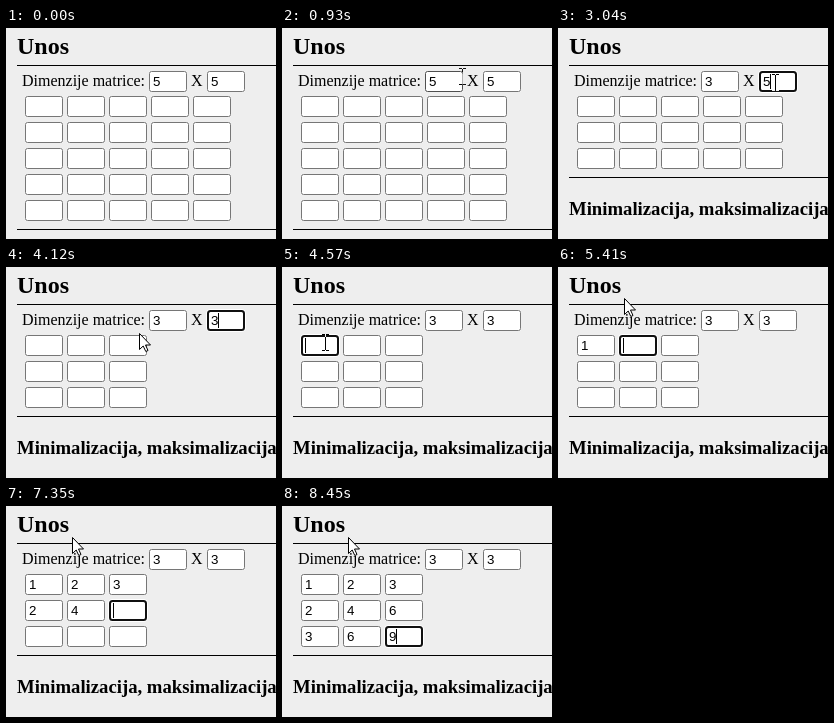
An HTML page with a canvas for the animation above (8820 ms loop, 270x211 px).

```html
<!DOCTYPE html>
<html lang="hr">
<head>
<meta charset="utf-8">
<style>
  html, body { margin: 0; width: 100%; height: 100%; overflow: hidden; background: #eee; }
  canvas { display: block; }
</style>
</head>
<body>
<canvas id="stage" width="270" height="211"></canvas>
<script>
const ctx = document.getElementById('stage').getContext('2d');
const LOOP = 8820, BLINK = 530, W = 38, H = 21;
const SERIF = '"Liberation Serif", "Times New Roman", serif';
const SANS = '13.33px "Liberation Sans", Arial, sans-serif';

// [time, field] moves the focus, [time, field, value] types a digit.
// Fields 0 and 1 are the dimensions, 2 to 10 the cells of the 3 x 3 matrix.
const actions = [
  [1180, 0], [2210, 0, '3'], [3040, 1], [3700, 1, '3'],
  [4550, 2], [5310, 2, '1'], [5410, 3], [5640, 3, '2'], [5740, 4], [5920, 4, '3'],
  [6050, 5], [7020, 5, '2'], [7120, 6], [7280, 6, '4'], [7350, 7], [7550, 7, '6'],
  [7650, 8], [7880, 8, '3'], [8010, 9], [8190, 9, '6'], [8320, 10], [8450, 10, '9']
];

// Mouse path: [time, x, y]
const path = [
  [410, 258, 36], [700, 215, 47], [1150, 147, 49], [1310, 147, 49], [1580, 187, 51],
  [2570, 187, 51], [2890, 217, 54], [3040, 217, 54], [3220, 193, 54], [4030, 193, 54],
  [4120, 133, 66], [4300, 80, 70], [4480, 45, 75], [4570, 43, 75], [4820, 66, 31]
];

const between = (v, a, b) => v >= a && v < b;
const inside = (p, x, y, w, h) => between(p.x, x, x + w) && between(p.y, y, y + h);

function mouseAt(t) {
  if (t < path[0][0]) return null;
  const next = path.findIndex(k => k[0] > t);
  if (next < 0) return { x: 66, y: 31 };
  const [t0, x0, y0] = path[next - 1], [t1, x1, y1] = path[next];
  const k = (t - t0) / (t1 - t0);
  return { x: Math.round(x0 + (x1 - x0) * k), y: Math.round(y0 + (y1 - y0) * k) };
}

function text(str, x, y, font, color = '#000') {
  ctx.font = font;
  ctx.fillStyle = color;
  ctx.fillText(str, x, y);
}

function outline(x, y, inset, width, radius, color) {
  ctx.beginPath();
  ctx.roundRect(x + inset, y + inset, W - 2 * inset, H - 2 * inset, radius);
  ctx.lineWidth = width;
  ctx.strokeStyle = color;
  ctx.stroke();
}

function field(x, y, value, { focused, hovered, selected, caret }) {
  ctx.fillStyle = '#fff';
  ctx.beginPath();
  ctx.roundRect(x, y, W, H, 2);
  ctx.fill();
  if (focused) {
    outline(x, y, -0.5, 1, 3.5, '#fff');
    outline(x, y, 1, 2, 2.5, '#101010');
  } else {
    outline(x, y, 0.5, 1, 2, hovered ? '#4f4f4f' : '#767676');
  }
  if (selected) {
    ctx.fillStyle = '#0078d7';
    ctx.fillRect(x + 4, y + 3, 8, 15);
  }
  text(value, x + 4, y + 15, SANS, selected ? '#fff' : '#000');
  if (caret) {
    ctx.fillStyle = '#000';
    ctx.fillRect(x + (value ? 11 : 4), y + 3, 1, 15);
  }
}

function drawBeam({ x, y }) {
  ctx.globalCompositeOperation = 'difference';
  ctx.fillStyle = '#fff';
  ctx.fillRect(x, y - 7, 1, 15);
  for (const edge of [y - 8, y + 8]) {
    ctx.fillRect(x - 3, edge, 3, 1);
    ctx.fillRect(x + 1, edge, 3, 1);
  }
  ctx.globalCompositeOperation = 'source-over';
}

function drawArrow({ x, y }) {
  const arrow = new Path2D('M.5 .5V16.5L4.2 13 6.8 18.5 9 17.5 6.5 12H11.5Z');
  ctx.save();
  ctx.translate(x, y);
  ctx.fillStyle = '#fff';
  ctx.fill(arrow);
  ctx.lineWidth = 1;
  ctx.strokeStyle = '#000';
  ctx.stroke(arrow);
  ctx.restore();
}

function draw(t) {
  const values = ['5', '5'];
  let focus = -1, lastAction = 0;
  for (const [time, index, value] of actions) {
    if (time > t) break;
    focus = index;
    lastAction = time;
    if (value) values[index] = value;
  }
  const rows = t < 2340 ? 5 : 3, cols = t < 3760 ? 5 : 3;
  const selection = between(t, 1340, 2210) ? 0 : between(t, 3100, 3700) ? 1 : -1;
  const caretOn = Math.floor((t - lastAction) / BLINK) % 2 === 0;
  const mouse = mouseAt(t);
  let overText = mouse && (inside(mouse, 16, 44, 123, 18) || inside(mouse, 185, 44, 12, 18));

  const place = (index, x, y) => {
    const focused = index === focus, selected = index === selection;
    const hovered = mouse && inside(mouse, x, y, W, H);
    overText = overText || hovered;
    field(x, y, values[index] || '', { focused, hovered, selected, caret: focused && !selected && caretOn });
  };

  ctx.fillStyle = '#eee';
  ctx.fillRect(0, 0, 270, 211);
  const bottom = rows * 26 + 71;
  ctx.fillStyle = '#000';
  ctx.fillRect(11, 37, 259, 1);
  ctx.fillRect(11, bottom, 259, 1);
  text('Unos', 11, 26, 'bold 24px ' + SERIF);
  text('Dimenzije matrice:', 16, 58, '16px ' + SERIF);
  text('X', 185, 58, '16px ' + SERIF);
  if (rows === 3) text('Minimalizacija, maksimalizacija', 11, bottom + 38, 'bold 18.72px ' + SERIF);

  place(0, 143, 43);
  place(1, 201, 43);
  for (let r = 0; r < rows; r++)
    for (let c = 0; c < cols; c++)
      place(cols === 3 ? 2 + r * 3 + c : null, 19 + c * 42, 68 + r * 26);

  if (!mouse) return;
  const dragging = between(t, 1310, 1600) || between(t, 3040, 3240);
  (overText || dragging ? drawBeam : drawArrow)(mouse);
}

const start = performance.now();
function tick() {
  draw((performance.now() - start) % LOOP);
  requestAnimationFrame(tick);
}
tick();
</script>
</body>
</html>
```
